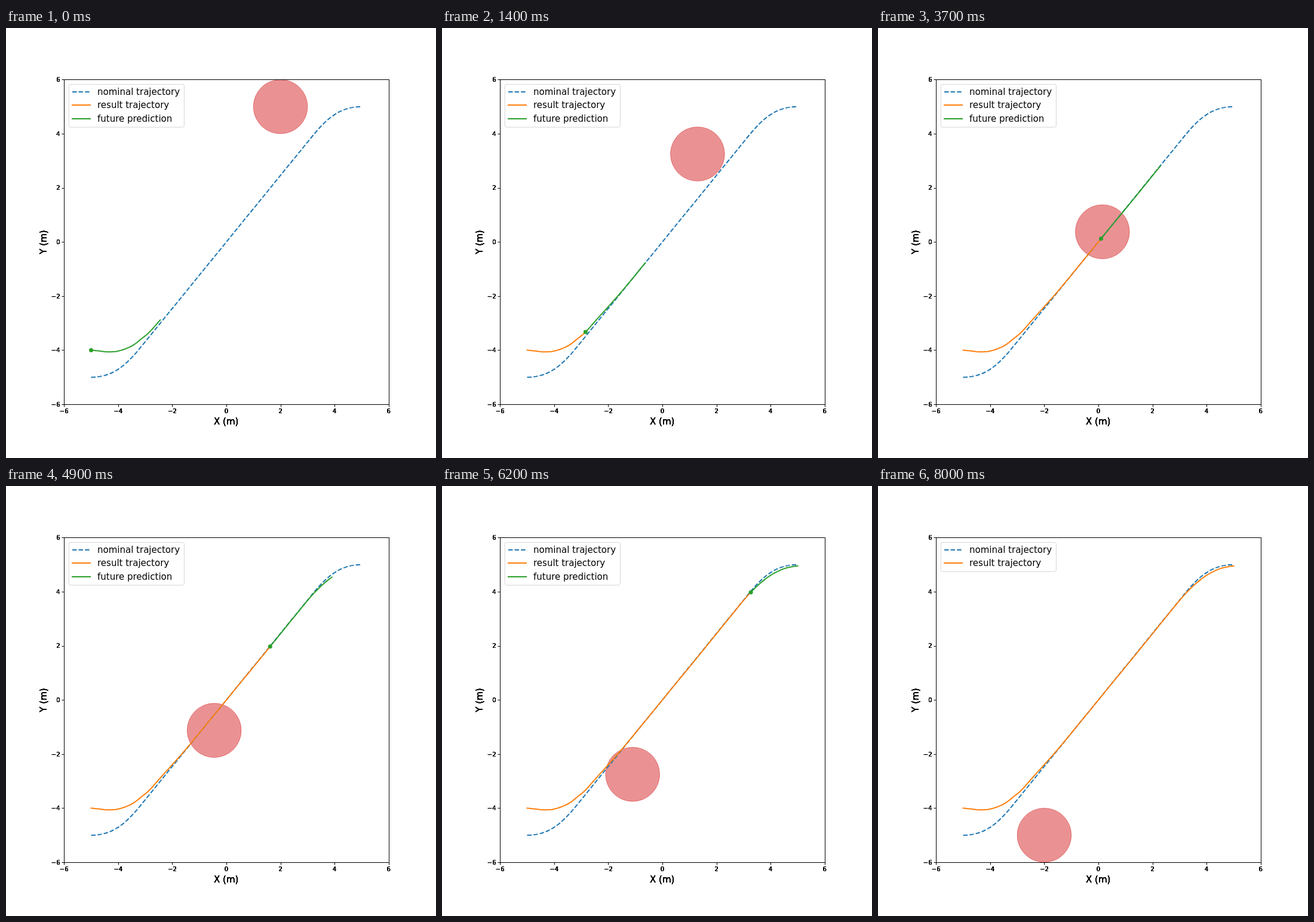
Write an HTML page that moves like this. It is 720 px wide and 720 px high and loops after 8100 ms.

```html
<!DOCTYPE html>
<html lang="en">
<head>
<meta charset="utf-8">
<title>Trajectory tracking</title>
<style>
  html, body { margin: 0; width: 100%; height: 100%; overflow: hidden; background: #fff; }
  svg { display: block; width: 720px; height: 720px; }
  text { font-family: "DejaVu Sans", sans-serif; font-size: 15px; fill: #000; }
  .tick { font-size: 10px; }
  .mid { text-anchor: middle; }
  .end { text-anchor: end; }
  .curve { fill: none; stroke-width: 2; stroke-linecap: square; stroke-linejoin: round; }
  .dash { stroke-linecap: butt; stroke-dasharray: 7.4 3.2; }
  .axis { fill: none; stroke: #000; stroke-width: 1; }
</style>
</head>
<body>
<svg id="stage" viewBox="0 0 720 720"></svg>
<script>
const BLUE = '#1f77b4', ORANGE = '#ff7f0e', GREEN = '#2ca02c', RED = '#d62728';
const UNIT = 45.3, STEP = 100, LAST = 80, HORIZON = 17.3;
const stage = document.getElementById('stage');
const px = x => 369 + UNIT * x;
const py = y => 358.2 - UNIT * y;
const snap = v => Math.floor(v + 0.5) + 0.5;

function add(tag, attrs, text) {
  const el = document.createElementNS('http://www.w3.org/2000/svg', tag);
  for (const name in attrs) el.setAttribute(name, attrs[name]);
  if (text) el.textContent = text;
  return stage.appendChild(el);
}

// Axis text is painted repeatedly, which gives its heavy edges.
function heavy(attrs, text) {
  for (let i = 0; i < 5; i++) add('text', attrs, text);
}

// Robot path: step, x, y
const KNOTS = [
  [0, -5, -4], [5, -4.17, -4.06], [9, -3.53, -3.865], [12, -3.1, -3.55],
  [14, -2.84, -3.33], [17.3, -2.445, -2.885], [24, -1.567, -1.905],
  [31, -0.669, -0.82], [37, 0.1, 0.12], [49, 1.618, 1.975], [56, 2.51, 3.075],
  [62, 3.27, 3.98], [66.3, 3.9, 4.54], [70, 4.44, 4.83], [74, 4.86, 4.935],
  [78, 5, 4.95], [80, 5, 4.95]
];

function slope(i, axis) {
  const a = KNOTS[Math.max(i - 1, 0)], b = KNOTS[Math.min(i + 1, KNOTS.length - 1)];
  return (b[axis] - a[axis]) / (b[0] - a[0]);
}

function robot(k) {
  let i = 0;
  while (i < KNOTS.length - 2 && KNOTS[i + 1][0] < k) i++;
  const a = KNOTS[i], b = KNOTS[i + 1], h = b[0] - a[0], u = (k - a[0]) / h;
  const blend = axis => {
    const m = h * slope(i, axis), n = h * slope(i + 1, axis), d = b[axis] - a[axis];
    return a[axis] + u * (m + u * (3 * d - 2 * m - n + u * (m + n - 2 * d)));
  };
  return [px(blend(1)), py(blend(2))];
}

function track(from, to) {
  const points = [];
  for (let k = from; k < to; k += 0.5) points.push(robot(k));
  points.push(robot(to));
  return points.map(p => p.map(v => v.toFixed(2)).join()).join(' ');
}

// Plot
const obstacle = add('circle', {
  r: UNIT, fill: RED, 'fill-opacity': 0.5, stroke: RED, 'stroke-opacity': 0.5
});
const at = (x, y) => px(x) + ' ' + py(y);
add('path', {
  class: 'curve dash', stroke: BLUE,
  d: `M${at(-5, -5)}C${at(-4.05, -5)} ${at(-3.55, -4.37)} ${at(-3, -3.69)}` +
     `L${at(3, 3.69)}C${at(3.55, 4.37)} ${at(4.05, 5)} ${at(5, 5)}`
});
const result = add('polyline', { class: 'curve', stroke: ORANGE });
const future = add('polyline', { class: 'curve', stroke: GREEN });
const dot = add('circle', { r: 3.5, fill: GREEN });

// Axes
add('rect', { class: 'axis', x: 97.5, y: 86.5, width: 544, height: 544 });
for (let v = -6; v <= 6; v += 2) {
  const label = String(v).replace('-', '\u2212');
  const x = px(v), y = py(v);
  add('path', { class: 'axis', d: `M${snap(x)} 630.5v4M97.5 ${snap(y)}h-4` });
  heavy({ class: 'tick mid', x: x, y: 645 }, label);
  heavy({ class: 'tick end', x: 90.6, y: Math.round(y + 3.8) }, label);
}
heavy({ class: 'mid', x: 368.7, y: 664 }, 'X (m)');
heavy({ class: 'mid', transform: 'translate(68 358.5) rotate(-90)' }, 'Y (m)');

// Legend
const box = add('rect', {
  x: 105.2, y: 94.4, width: 193.2, rx: 3, fill: '#fff', stroke: '#ccc', opacity: 0.8
});
function entry(y, color, label, style) {
  return [
    add('path', { class: 'curve ' + style, stroke: color, d: `M111 ${y}h30` }),
    add('text', { x: 153, y: y + 5 }, label)
  ];
}
entry(107, BLUE, 'nominal trajectory', 'dash');
entry(129, ORANGE, 'result trajectory', '');
const ahead = [future, dot, ...entry(152, GREEN, 'future prediction', '')];

function draw(k) {
  const done = k === LAST;
  obstacle.setAttribute('cx', px(2 - 0.05 * k));
  obstacle.setAttribute('cy', py(5 - 0.125 * k));
  result.setAttribute('points', k ? track(0, k) : '');
  future.setAttribute('points', track(k, Math.min(k + HORIZON, LAST)));
  const [x, y] = robot(k);
  dot.setAttribute('cx', x);
  dot.setAttribute('cy', y);
  box.setAttribute('height', done ? 49 : 71.7);
  for (const el of ahead) el.setAttribute('visibility', done ? 'hidden' : 'visible');
}

let start = null, shown = 0;
function tick(now) {
  if (start === null) start = now;
  const k = Math.floor(Math.max(0, now - start) / STEP) % (LAST + 1);
  if (k !== shown) draw(shown = k);
  requestAnimationFrame(tick);
}
draw(0);
requestAnimationFrame(tick);
</script>
</body>
</html>
```
